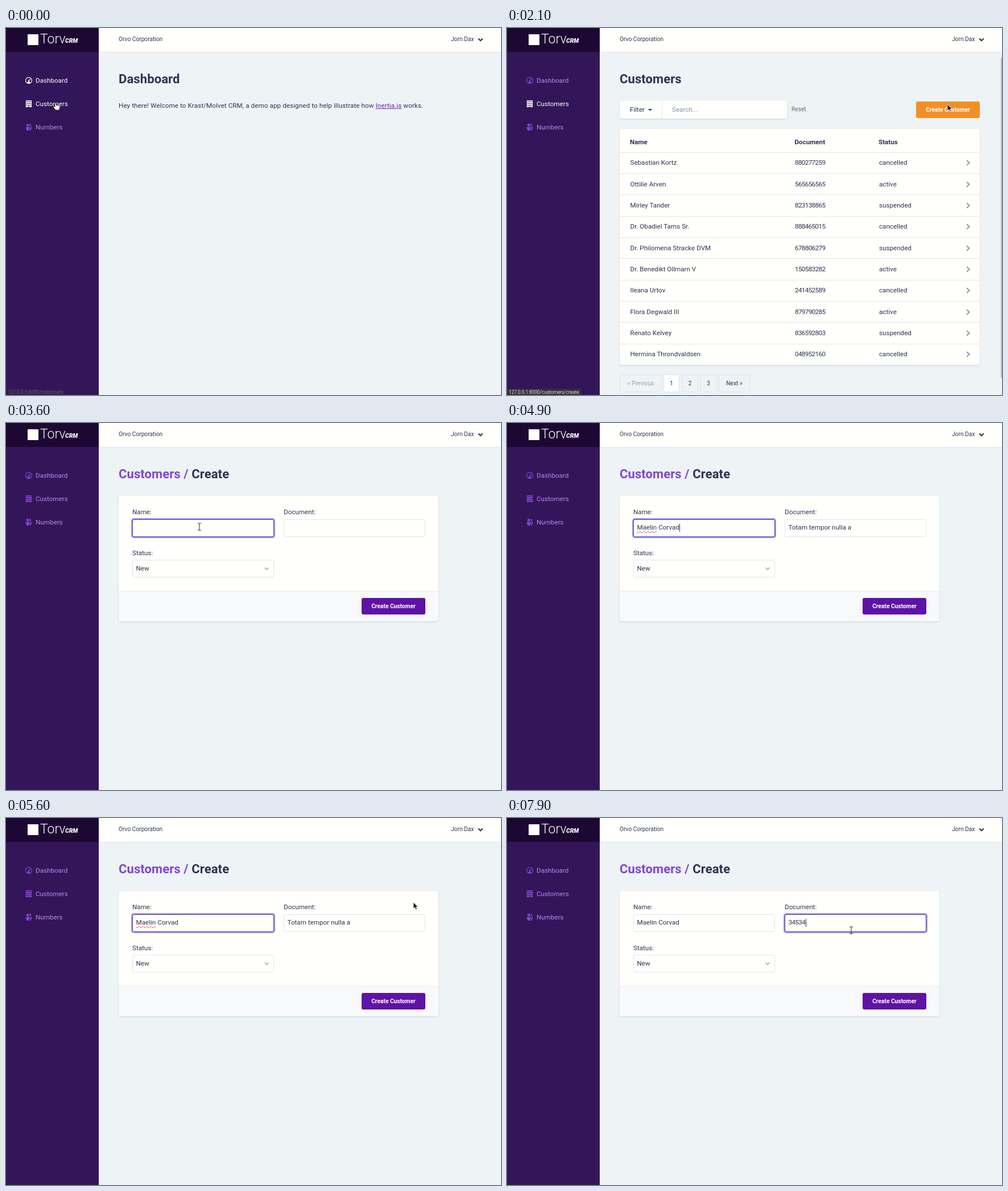
Recreate the animation shown at these times as an HTML page. Size 870 by 644 pixels, loop 8 s.

```html
<!DOCTYPE html>
<html lang="en">
<head>
<meta charset="utf-8">
<title>CRM demo</title>
<style>
html, body { margin: 0; width: 100%; height: 100%; overflow: hidden; }
body { position: relative; background: #eef3f6; color: #2f3252; font: 11.65px/20px Roboto, "Open Sans", sans-serif; }
div, span, svg { position: absolute; left: 0; top: 0; box-sizing: border-box; white-space: nowrap; }
.page, .layer { inset: 0; }
.small { font-size: 10.2px; }
.bold { font-weight: 700; }
h1 { position: absolute; margin: 0; left: 198px; top: 75px; font: 700 22px/30px Roboto, "Open Sans", sans-serif; letter-spacing: .1px; white-space: nowrap; }
i { font-style: normal; }
h1 i { color: #7f47d2; }
.card { background: #fffffc; border-radius: 4px; box-shadow: 0 1px 3px rgba(40, 50, 80, .16); }
.line { height: 1px; background: #e2e7ed; }
.btn { width: 112.5px; height: 29.5px; border-radius: 3px; background: #5f12a6; color: #fffffc; font: 700 10.2px/29px Roboto, sans-serif; text-align: center; }
.field { width: 249px; height: 31px; background: #fffffc; border: 1px solid #dfe4ee; border-radius: 3px; }
.field.focus { border-color: #5a3fb4; box-shadow: 0 0 0 2px #9a92ec; }
.nav { width: 163px; height: 20px; color: #b588ee; --icon: #8146d2; }
.nav.on { color: #fffffc; --icon: #fffffc; }
.nav svg { left: 34px; top: 4px; width: 12px; height: 12px; fill: var(--icon); }
.nav span { left: 52px; }
.pager div { top: 608px; height: 31px; border: 1px solid #dfe4eb; border-radius: 3px; text-align: center; font-size: 10.2px; line-height: 29px; }
.num { letter-spacing: -.62px; }
.caret { width: 1px; height: 14px; top: 177px; background: #2f3252; }
.typo { text-decoration: underline wavy #d8415a 1px; text-underline-offset: 2px; text-decoration-skip-ink: none; }
#hello { left: 198px; top: 126px; letter-spacing: .09px; }
#hello u { color: #6a23b0; }
#doc { left: 494.5px; top: 175px; line-height: 16px; }
#doc.picked { background: #1e90ff; color: #fffffc; }
#status { top: auto; bottom: 0; height: 11px; padding: 0 3px; background: #35313b; color: #d6d5d8; font-size: 8.7px; line-height: 12px; letter-spacing: -.22px; border-radius: 0 2px 0 0; }
#tint { background: rgba(122, 150, 244, .35); }
#tint span { left: 421px; top: 316px; width: 34px; height: 11px; border-radius: 2px; background: #7d9ae4; color: #f3f6ff; font: 8px/11px "DejaVu Sans Mono", monospace; text-align: center; letter-spacing: -.1px; }
#tint i { opacity: .5; }
#cursor svg { overflow: visible; width: 1px; height: 1px; }
</style>
</head>
<body>
<div class="page" id="home">
  <h1>Dashboard</h1>
  <span id="hello">Hey there! Welcome to Krast/Molvet CRM, a demo app designed to help illustrate how <u>Inertia.js</u> works.</span>
</div>

<div class="page" id="list">
  <h1>Customers</h1>
  <div class="card" style="left:198px;top:127px;width:294px;height:32px"></div>
  <div style="left:272px;top:127px;width:1px;height:32px;background:#e4e8ee"></div>
  <span style="left:216px;top:133px">Filter</span>
  <svg style="left:248px;top:142px" width="7" height="4"><path d="M0 0h7L3.5 3.5z" fill="#2f3252"/></svg>
  <span style="left:290px;top:133px;color:#8d919e">Search...</span>
  <span class="small" style="left:500px;top:133px;color:#62677f">Reset</span>
  <div class="btn" id="add" style="left:718.8px;top:128.7px">Create Customer</div>
  <div class="card" style="left:198px;top:177px;width:633px;height:414px"></div>
  <span class="bold" style="left:216px;top:190px">Name</span>
  <span class="bold" style="left:505.5px;top:190px">Document</span>
  <span class="bold" style="left:653px;top:190px">Status</span>
  <div class="layer" id="rows"></div>
  <div class="layer pager">
    <div style="left:198px;width:74px;color:#9aa1b0">« Previous</div>
    <div style="left:275px;width:28px;background:#fffffc">1</div>
    <div style="left:307px;width:29px">2</div>
    <div style="left:339px;width:30px">3</div>
    <div style="left:372px;width:55px">Next »</div>
  </div>
  <div style="left:868px;top:52px;width:2px;height:562px;background:#b4b6ba"></div>
</div>

<div class="page" id="form">
  <h1><i>Customers /</i> Create</h1>
  <div class="card" style="left:198px;top:128px;width:562px;height:220px"></div>
  <div style="left:198px;top:295px;width:562px;height:53px;background:#f7f9fa;border-top:1px solid #e8ecf0;border-radius:0 0 4px 4px"></div>
  <span style="left:222px;top:146px">Name:</span>
  <span style="left:488px;top:146px">Document:</span>
  <span style="left:222px;top:218px">Status:</span>
  <div class="field" id="nameBox" style="left:221.5px;top:168.5px"></div>
  <div class="field" id="docBox" style="left:488px;top:168.5px"></div>
  <div class="field" style="left:221.5px;top:240px"></div>
  <span style="left:228.5px;top:245px">New</span>
  <svg style="left:454px;top:253px" width="8" height="6"><path d="M.7.8 4 4.2 7.3.8" fill="none" stroke="#9aa0b0" stroke-width="1.4"/></svg>
  <span id="name" style="left:228.5px;top:173px"><i>Maelin</i> Corvad</span>
  <span id="doc"></span>
  <div class="caret" id="caret"></div>
  <div class="btn" style="left:624.7px;top:306.7px">Create Customer</div>
</div>

<div style="width:163px;height:644px;background:#331659"></div>
<div style="width:163px;height:42px;background:#1d0834"></div>
<div style="left:38px;top:11px;width:19px;height:19px;background:#fffffc"></div>
<span style="left:60px;top:6px;font-size:23px;line-height:28px;font-weight:300;color:#fffffc">Torv</span>
<span style="left:104px;top:13px;font-size:10.5px;font-weight:900;font-style:italic;color:#fffffc">CRM</span>
<div style="left:163px;width:707px;height:43px;background:#fffffc;border-bottom:1px solid #dfe4ec"></div>
<span class="small" style="left:198px;top:10px">Orvo Corporation</span>
<span class="small" style="left:782px;top:10px">Jorn Dax</span>
<svg style="left:829px;top:17px" width="10" height="8"><path d="M1.2 1.5 5 5.3 8.8 1.5" fill="none" stroke="#2f3252" stroke-width="2"/></svg>

<div class="nav" id="navHome" style="top:82px">
  <svg viewBox="0 0 20 20"><circle cx="10" cy="10" r="9" fill="none" stroke="var(--icon)" stroke-width="2"/><path d="M4 16a10 10 0 0 1 12 0l-2 2H6zM9 10l5-5 1.5 1.5-5 5z"/><circle cx="10" cy="11.5" r="2"/></svg>
  <span>Dashboard</span>
</div>
<div class="nav" id="navList" style="top:123px">
  <svg viewBox="0 0 100 100"><path fill-rule="evenodd" id="tower"/></svg>
  <span>Customers</span>
</div>
<div class="nav" style="top:164px">
  <svg viewBox="0 0 20 20"><circle cx="7" cy="4" r="4"/><path d="M1 10q6-2 12 0l-1 6h-1.2l-.8 4H4l-.8-4H2zM15.3 9.2l3.8.9L18 16h-1.2L16 20h-4l.4-2h1.3zM11.7.2a4 4 0 1 1 0 7.6 6 6 0 0 0 0-7.6z"/></svg>
  <span>Numbers</span>
</div>

<div id="status"></div>
<div class="layer" id="tint"><span><i>&lt;</i>Root<i>&gt;</i></span></div>
<div id="cursor">
  <svg id="arrow"><path d="M0 0v11l2.5-2.2 1.9 4 1.9-.9-1.8-3.8h3.5z" fill="#17171b" stroke="#f4f4f4" stroke-width=".8"/></svg>
  <svg id="hand"><path d="M-1 .8q1.2-1.6 2.3 0v3.4l5 .9q1.7.4 1.5 2.3l-.7 3.2-.9 2.4H.3L-3.6 8q-.6-1.6 1-1.5L-1 7.6z" fill="#fff" stroke="#2a2436" stroke-width=".8"/></svg>
  <svg id="beam"><path d="M-3-6h2q1 0 1 1v10q0 1-1 1h-2M3-6H1Q0-6 0-5M3 6H1Q0 6 0 5" fill="none" stroke="#33343c" stroke-width="1.1"/></svg>
</div>

<script>
const $ = id => document.getElementById(id);
const show = (id, on) => $(id).style.visibility = on ? "inherit" : "hidden";
const LOOP = 8000, STEP = 100;

const people = [
  ["Sebastian Kortz", "880277259", "cancelled"],
  ["Ottilie Arven", "565656565", "active"],
  ["Mirley Tander", "823138865", "suspended"],
  ["Dr. Obadiel Tarns Sr.", "888465015", "cancelled"],
  ["Dr. Philomena Stracke DVM", "678806279", "suspended"],
  ["Dr. Benedikt Ollmarn V", "150583282", "active"],
  ["Ileana Urtov", "241452589", "cancelled"],
  ["Flora Degwald III", "879790285", "active"],
  ["Renato Kelvey", "836592803", "suspended"],
  ["Hermina Throndvaldsen", "048952160", "cancelled"]
];
$("rows").innerHTML = people.map(([name, doc, state], i) => {
  const y = 218 + i * 37.35;
  return `<div class="line" style="left:198px;top:${Math.round(y - .5)}px;width:633px"></div>
    <div style="top:${y + 8.3}px">
      <span style="left:216.5px">${name}</span>
      <span class="num" style="left:506px">${doc}</span>
      <span style="left:654px">${state}</span>
      <svg style="left:806px;top:5px" width="9" height="11"><path d="M2 1.2 6.5 5.5 2 9.8" fill="none" stroke="#9499ac" stroke-width="2"/></svg>
    </div>`;
}).join("");

let tower = "M7 0h86v100H57V88H43v12H7z";
for (const x of [16, 35, 54, 73])
  for (const y of [11, 37, 64]) tower += `M${x} ${y}h11v15h-11z`;
$("tower").setAttribute("d", tower);

// Pointer path: time, x, y, shape from that time on
const path = [
  [0, 87, 131, "hand"], [200, 86, 134, "hand"], [400, 86, 134, "hand"],
  [500, 84, 134, "hand"], [1100, 84, 134, "hand"], [1200, 110, 134, "arrow"],
  [1600, 735, 139, "hand"], [1800, 774, 134, "hand"], [2000, 774, 134, "hand"],
  [2100, 774, 134, "arrow"], [2200, 773, 136, "arrow"], [2300, 773, 136, "arrow"],
  [2800, 551, 193, "arrow"], [2900, 551, 193, "arrow"], [3000, 346, 183, "beam"],
  [3500, 346, 183, "beam"], [3600, 340, 182, "beam"], [3800, 340, 182, "beam"],
  [3900, 430, 172, "arrow"], [4000, 572, 150, "arrow"], [4100, 572, 150, ""],
  [5600, 716, 148, "arrow"], [5900, 660, 180, "beam"], [6000, 649, 184, "beam"],
  [6600, 649, 184, "beam"], [6800, 497, 184, "beam"], [6900, 497, 184, "beam"],
  [7000, 464, 184, "beam"], [7200, 606, 197, "beam"], [7300, 606, 197, "beam"],
  [7400, 609, 203, "beam"], [7600, 605, 197, "beam"], [LOOP, 605, 197, "beam"]
];

function pointer(t) {
  const i = path.findIndex(p => p[0] > t);
  const [t0, x0, y0, kind] = path[i - 1], [t1, x1, y1] = path[i];
  const k = (t - t0) / (t1 - t0);
  return { x: x0 + (x1 - x0) * k, y: y0 + (y1 - y0) * k, kind };
}

function docText(t) {
  if (t < 4900) return "";
  if (t < 7400) return "Totam tempor nulla a";
  return "34534".slice(0, 1 + (t - 7400) / STEP);
}

function draw(t) {
  const onForm = t >= 2200, onList = t >= 700 && !onForm;
  show("home", t < 700);
  show("list", onList);
  show("form", onForm);
  $("navHome").classList.toggle("on", t < 700);
  $("navList").classList.toggle("on", !onForm);
  $("add").style.background = t >= 1600 ? "#f29027" : "";

  const status = $("status");
  status.textContent = "127.0.0.1:8000/customers" + (t >= 1600 ? "/create" : "");
  status.style.opacity = t < 200 ? .3 + t / 200 : t < 2400 ? 1 : Math.max(0, 1 - (t - 2300) / 300);

  const inName = t >= 3000 && t < 6200, inDoc = t >= 6200;
  const filled = t >= 4900, picked = t >= 6500 && t < 7400;
  const name = $("name"), doc = $("doc");
  $("nameBox").classList.toggle("focus", inName);
  $("docBox").classList.toggle("focus", inDoc);
  show("name", filled);
  name.firstChild.className = inName ? "typo" : "";
  doc.textContent = docText(t);
  doc.classList.toggle("num", t >= 7400);
  doc.classList.toggle("picked", picked);

  const field = inDoc ? doc : name;
  const end = field.offsetLeft + (filled ? field.offsetWidth : 0);
  $("caret").style.left = end + "px";
  show("caret", onForm && !picked && (inDoc || inName && (t < 3600 || t >= 4300 && t < 5500)));

  show("tint", t >= 5500 && t < 5600);
  const p = pointer(t);
  $("cursor").style.transform = `translate(${p.x}px, ${p.y}px)`;
  for (const kind of ["arrow", "hand", "beam"]) show(kind, kind === p.kind);
}

const start = performance.now();
function tick(now) {
  const t = Math.max(0, now - start) % LOOP;
  draw(Math.floor(t / STEP) * STEP);
  requestAnimationFrame(tick);
}
draw(0);
requestAnimationFrame(tick);
</script>
</body>
</html>
```
